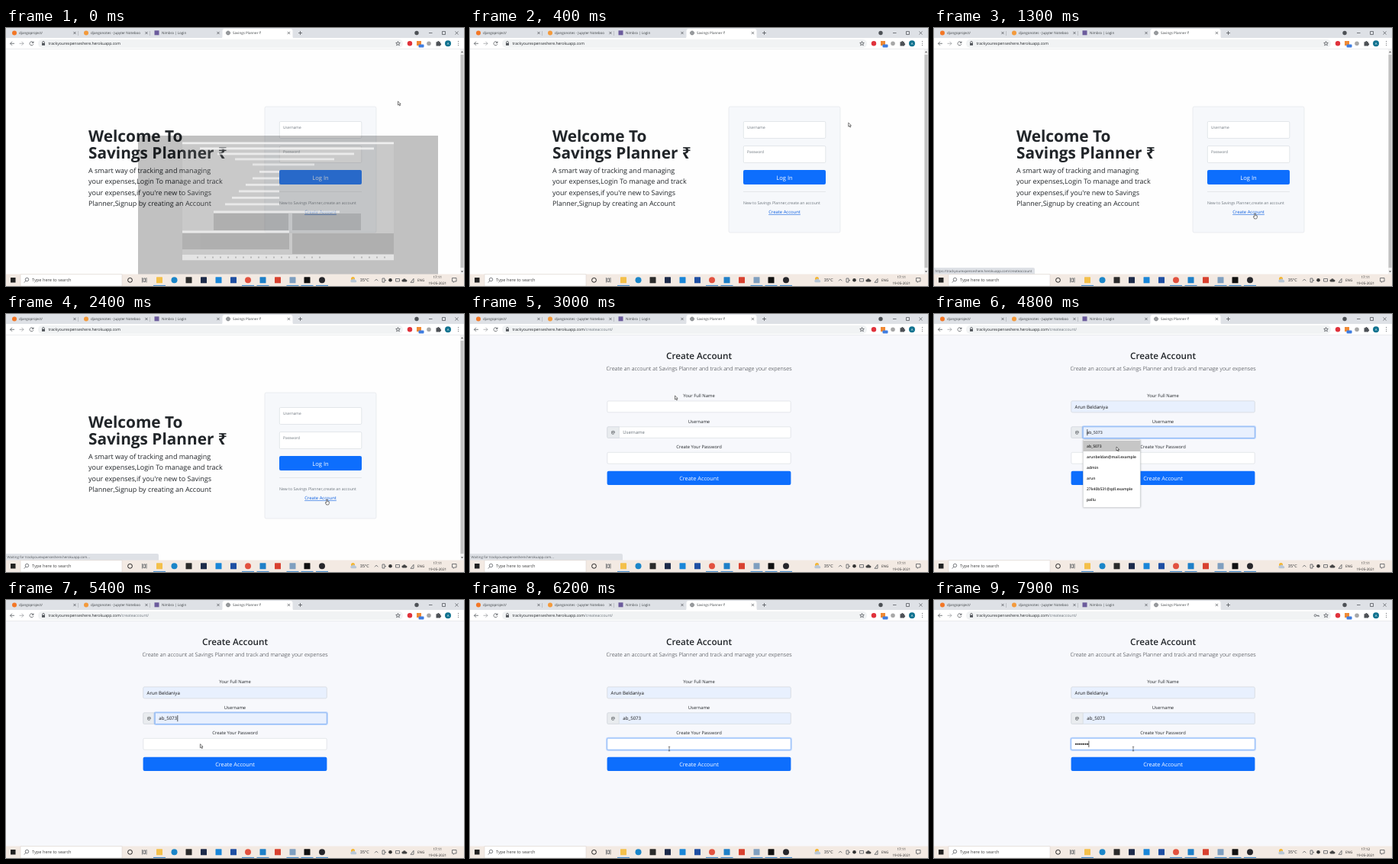
Recreate the animation shown at these times as an HTML page. Size 600x338 px, loop 8 s.

```html
<!DOCTYPE html>
<html lang="en">
<head>
<meta charset="utf-8">
<title>Create account</title>
<style>
  html, body { margin: 0; width: 100%; height: 100%; overflow: hidden; background: #fff; }
  svg { display: block; width: 100vw; height: 100vh; }
  text { font-family: "Open Sans", "Noto Sans", sans-serif; fill: #212529; text-rendering: geometricPrecision; white-space: pre; }
  .mid { text-anchor: middle; }
  .tab { font-size: 4.55px; fill: #3c4043; }
  .url { font-size: 5.1px; }
  .soft { fill: #6c757d; }
  .status { font-size: 4.4px; fill: #50555a; }
  .lead { font-size: 9px; }
  .head { font-size: 20.8px; font-weight: 700; }
  .label { font-size: 5.85px; }
  .value { font-size: 6.1px; fill: #111; }
  .hint { font-size: 5.25px; fill: #111; }
  .item { font-size: 5px; font-weight: 600; fill: #222; }
  .tray { font-size: 4.55px; fill: #222; }
  .input { fill: #fff; stroke: #d3d8de; stroke-width: .6; }
  .auto { fill: #e8f0fe; }
  .ring { fill: none; stroke: #0d6efd; stroke-opacity: .27; stroke-width: 1.7; }
  .focus { stroke: #86b7fe; }
  .menu { fill: #fff; stroke: #c3c6ca; stroke-width: .5; filter: drop-shadow(0 .8px 1px #0004); }
  .line { fill: none; stroke: #4d5156; stroke-width: .75; }
  .caret { stroke: #000; stroke-width: .65; }
</style>
</head>
<body>
<svg viewBox="0 0 600 338">
  <!-- Login page -->
  <g data-on="0 2800">
    <rect y="27" width="600" height="296" fill="#fefefe"/>
    <text class="head" x="108" y="149">Welcome To</text>
    <text class="head" x="108" y="171.2">Savings Planner ₹</text>
    <g class="lead">
      <text x="108" y="190.4">A smart way of tracking and managing</text>
      <text x="108" y="204.4">your expenses,Login To manage and track</text>
      <text x="108" y="218.5">your expenses,if you're new to Savings</text>
      <text x="108" y="232.6">Planner,Signup by creating an Account</text>
    </g>
    <rect x="339" y="103" width="146" height="165" rx="2" fill="#f6f8fb" stroke="#dfe3e8" stroke-width=".6"/>
    <rect class="input" x="358.3" y="122.5" width="107.5" height="22" rx="1.5"/>
    <rect class="input" x="358.3" y="154.5" width="107.5" height="22" rx="1.5"/>
    <text class="soft" x="363" y="131.5" font-size="4.9">Username</text>
    <text class="soft" x="363" y="163.8" font-size="4.9">Password</text>
    <rect x="358" y="186" width="108" height="19" rx="2" fill="#0d6efd"/>
    <text class="mid" x="412" y="198.8" font-size="7.6" style="fill:#fff">Log In</text>
    <path d="M358 214.5h108" stroke="#d9dce0" stroke-width=".6"/>
    <text class="soft" x="358" y="231.3" font-size="5.2">New to Savings Planner,create an account</text>
    <text class="mid" x="412" y="243.3" font-size="5.9" text-decoration="underline" style="fill:#0d5fe0">Create Account</text>
    <rect x="595" y="28" width="5" height="295" fill="#f1f1f1"/>
    <rect x="595.5" y="35" width="4" height="279" fill="#c1c1c1"/>
    <path d="M596 32.3l1.5-2 1.5 2zM596 318.2l1.5 2 1.5-2z" fill="#555"/>
  </g>

  <!-- Account form -->
  <g data-on="2800 8000">
    <rect y="27" width="600" height="296" fill="#f7f8fc"/>
    <text class="mid" x="300" y="59.3" font-size="11.7" font-weight="600">Create Account</text>
    <text class="mid" x="300" y="74" font-size="7.22" font-weight="300">Create an account at Savings Planner and track and manage your expenses</text>
    <text class="mid label" x="300" y="108.5">Your Full Name</text>
    <text class="mid label" x="300" y="142.5">Username</text>
    <text class="mid label" x="300" y="176">Create Your Password</text>

    <rect class="input" x="179.8" y="114" width="240.4" height="14.8" rx="1.6"/>
    <rect class="input" x="179.8" y="147.8" width="240.4" height="14.6" rx="1.6"/>
    <path d="M195.3 147.8h-14a1.5 1.5 0 0 0-1.5 1.6v11.4a1.5 1.5 0 0 0 1.5 1.6h14z" fill="#e9ecef" stroke="#ced4da" stroke-width=".6"/>
    <text class="mid label" x="187.5" y="157.2">@</text>
    <rect class="input" x="179.8" y="181.3" width="240.4" height="14.8" rx="1.6"/>
    <rect x="179.6" y="205.8" width="240.8" height="18.3" rx="2" fill="#0d6efd"/>
    <text class="mid" x="300" y="217.8" font-size="7.3" style="fill:#fff">Create Account</text>

    <rect class="input auto" data-on="3700 8000" x="179.8" y="114" width="240.4" height="14.8" rx="1.6"/>
    <g data-on="3700 4600">
      <rect class="ring" x="179" y="113.2" width="242" height="16.4" rx="2.2"/>
      <rect class="focus" fill="none" stroke-width=".7" x="179.8" y="114" width="240.4" height="14.8" rx="1.6"/>
    </g>
    <text class="hint" data-on="3700 4200" x="184.6" y="123.7">Arun Beldaniya</text>
    <text class="value" data-on="4200 8000" x="184.6" y="123.9">Arun Beldaniya</text>
    <path class="caret" data-on="3700 4200" d="M185 117.3v8.4"/>
    <path class="caret" data-on="4200 4600" d="M228.6 117.3v8.4"/>

    <text class="soft" data-on="2800 4600" x="200.3" y="157.4" font-size="5.9">Username</text>
    <rect class="input auto" data-on="4600 8000" x="195.3" y="147.8" width="224.9" height="14.6" rx="1"/>
    <g data-on="4600 5700">
      <rect class="ring" x="194.5" y="147" width="226.5" height="16.2" rx="1.6"/>
      <rect class="focus" fill="none" stroke-width=".7" x="195.3" y="147.8" width="224.9" height="14.6" rx="1"/>
    </g>
    <text class="hint" data-on="4600 5000" x="200.3" y="157.2">ab_5073</text>
    <text class="value" data-on="5000 8000" x="200.3" y="157.4">ab_5073</text>
    <path class="caret" data-on="4600 5000" d="M200.8 151v8.2"/>
    <path class="caret" data-on="5000 5500" d="M224.8 151v8.2"/>

    <g data-on="5700 8000">
      <rect class="ring" x="179" y="180.5" width="242" height="16.4" rx="2.2"/>
      <rect class="focus" fill="#fff" stroke-width=".7" x="179.8" y="181.3" width="240.4" height="14.8" rx="1.6"/>
    </g>
    <g id="dots"></g>
    <path id="caret" class="caret" data-on="5700 6200 6500 8000" d="M0 184.5v8.4"/>

    <g id="names" data-on="3700 4200"></g>
    <g id="users" data-on="4600 5000"></g>
  </g>

  <!-- Status bubble -->
  <g data-on="1000 2300">
    <path d="M0 314h130a2 2 0 0 1 2 2v7H0z" fill="#dee1e6"/>
    <text class="status" x="1.5" y="320">https://trackyourexpenseshere.herokuapp.com/createaccount</text>
  </g>
  <g data-on="2300 3400">
    <path d="M0 314h198a2 2 0 0 1 2 2v7H0z" fill="#dee1e6"/>
    <text class="status" x="1.5" y="320">Waiting for trackyourexpenseshere.herokuapp.com...</text>
  </g>

  <!-- Minimising window -->
  <g id="ghost" data-on="0 300">
    <rect x="173" y="141" width="393" height="182" opacity=".24"/>
    <rect x="231" y="153" width="277" height="152" fill="#fff" opacity=".12"/>
    <g opacity=".12">
      <rect x="272" y="243" width="98" height="22"/>
      <rect x="375" y="243" width="90" height="22"/>
      <rect x="231" y="269" width="140" height="21"/>
      <rect x="375" y="269" width="133" height="27"/>
    </g>
    <g id="nest" fill="#fff"></g>
    <rect x="231" y="297" width="277" height="7" fill="#fff" opacity=".5"/>
    <path d="M250 300.5h170M455 300.5h45" stroke="#777" stroke-width="2" stroke-dasharray="2 8" opacity=".4"/>
  </g>

  <!-- Browser frame -->
  <rect width="600" height="13.5" fill="#dee1e6"/>
  <rect y="13" width="600" height="14.5" fill="#fff"/>
  <path d="M0 27.5h600" stroke="#dfe1e4" stroke-width=".6"/>
  <path d="M281 13.5q2.5 0 2.5-2.5V4q0-3 3-3h86q3 0 3 3v7q0 2.5 2.5 2.5z" fill="#fff"/>
  <path d="M94.5 4v6M188.5 4v6" stroke="#9a9da2" stroke-width=".5"/>
  <circle cx="11" cy="6.5" r="3" fill="#f37726"/>
  <circle cx="105" cy="6.5" r="3" fill="#f39a3c"/>
  <rect x="194.5" y="3.3" width="6" height="6" fill="#6b5b9c"/>
  <g class="line"><circle cx="291" cy="6.5" r="2.4"/><path d="M288.5 6.5h5M291 4v5"/></g>
  <text class="tab" x="17" y="8.2">djangoproject/</text>
  <text class="tab" x="111" y="8.2">djangonotes - Jupyter Noteboo</text>
  <text class="tab" x="204" y="8.2">Nimbra | Login</text>
  <text class="tab" x="297" y="8.2">Savings Planner ₹</text>
  <g class="line" id="closers"></g>
  <path class="line" d="M383 6.5h5M385.5 4v5M554 6.5h4.5M571.5 4.5h4v4h-4zM588.5 4.500l4 4M592.5 4.500l-4 4"/>
  <circle cx="538" cy="6.5" r="2.7" fill="#4d5156"/>
  <rect x="42" y="14.7" width="478" height="11.3" rx="5.6" fill="#f1f3f4"/>
  <path class="line" d="M11 20.3H5.5M8 17.8l-2.5 2.5 2.5 2.5M35.8 19.2a2.5 2.5 0 1 0 .1 2M36 17.5v2h-2"/>
  <path class="line" d="M17.5 20.3H23M20.5 17.8l2.5 2.5-2.5 2.5" opacity=".55"/>
  <path class="line" d="M47.6 20v-1.2a1.4 1.4 0 0 1 2.8 0V20"/>
  <rect x="47" y="19.8" width="4" height="3" rx=".4" fill="#4d5156"/>
  <text class="url" x="55.5" y="22.1">trackyourexpenseshere.herokuapp.com<tspan class="soft" data-on="2800 8000">/createaccount/</tspan></text>
  <g class="line" data-on="6500 8000"><circle cx="499.5" cy="20.3" r="1.4"/><path d="M501 20.3h3.2v1.7M502.8 20.3v1.3"/></g>
  <path class="line" d="M513.5 17.5l.8 1.9 2 .1-1.6 1.3.6 2-1.8-1.1-1.8 1.1.6-2-1.6-1.3 2-.1z"/>
  <circle cx="529" cy="20.3" r="3.2" fill="#e0323c"/>
  <rect x="538" y="17" width="6" height="6" fill="#f08a35"/>
  <rect x="540.5" y="21.5" width="7" height="4" rx="1" fill="#3f7de0"/>
  <circle cx="554" cy="20.3" r="2.8" fill="#a8a8a8"/>
  <path d="M563.5 18.3h1.7a1.2 1.2 0 0 1 2.4 0h1.4v1.8a1.2 1.2 0 0 1 0 2.4v1h-5.5z" fill="#4d5156"/>
  <circle cx="579" cy="20.3" r="4" fill="#10728f"/>
  <text class="mid" x="579" y="21.9" font-size="4.3" style="fill:#fff">A</text>
  <path d="M592.5 17.5v5.7" stroke="#4d5156" stroke-width="1.1" stroke-linecap="round" stroke-dasharray="0 2.5"/>

  <!-- Taskbar -->
  <rect y="322.5" width="600" height="15.5" fill="#f3eae3"/>
  <rect x="19" y="322.8" width="133" height="15.2" fill="#fff" stroke="#d5cec8" stroke-width=".5"/>
  <rect x="6" y="327" width="6.5" height="6.5" fill="#222"/>
  <g class="line"><circle cx="27.5" cy="329.5" r="2.2"/><path d="M26 331.2l-2.2 2.3"/></g>
  <text x="34" y="332.4" font-size="5.65" style="fill:#444">Type here to search</text>
  <circle cx="162.5" cy="330.3" r="2.9" fill="none" stroke="#222"/>
  <path class="line" d="M178.5 327v6.5M184 327v6.5M180 328h2.5v4.5H180z"/>
  <g id="apps"></g>
  <circle cx="454.5" cy="328.5" r="2.5" fill="#f5b52e"/>
  <path d="M452.5 333.3a1.8 1.8 0 0 1 .6-3.5 2.5 2.5 0 0 1 4.5.2 1.7 1.7 0 0 1 .5 3.3z" fill="#b9c7d6"/>
  <text x="463.8" y="332.3" font-size="5.45">35°C</text>
  <path class="line" d="M483 331.3l2.2-2.2 2.2 2.2M493 328h3v5h-3zM496 330.5h2M510.5 328.5h5v3.5h-5zM530 333.3l4-5v5z"/>
  <circle cx="503.5" cy="330.3" r="2.3" fill="#333"/>
  <path d="M519.8 332.5a1.5 1.5 0 0 1 .3-3 2 2 0 0 1 3.8.2 1.4 1.4 0 0 1 .3 2.8z" fill="#444"/>
  <text class="tray" x="539" y="332">ENG</text>
  <text class="tray mid" x="565.3" y="328.3"><tspan data-on="0 7000">17:11</tspan><tspan data-on="7000 8000">17:12</tspan></text>
  <text class="tray mid" x="565.3" y="335.6">19-05-2021</text>
  <path class="line" d="M584.5 327.5h5.5v4.5h-2.5l-1.2 1.3v-1.3h-1.8z"/>

  <g id="pointer">
    <path data-on="0 900 2500 3300 3800 4400 4700 5500" d="M0 0v5l1.2-1 .9 1.9.9-.4-.9-1.9h1.6z" fill="#fff" stroke="#222" stroke-width=".6"/>
    <path data-on="900 2500" d="M-.6 0h1.2v2.4l2.2.5v2.4l-.8 1.6H-.8L-2.2 4l.7-.6.9.7z" fill="#fff" stroke="#222" stroke-width=".6"/>
    <path data-on="3300 3800 4400 4700 5500 8000" d="M-1.2-2.7h2.4M0-2.7v5.4M-1.2 2.7h2.4" fill="none" stroke="#333" stroke-width=".6"/>
  </g>
</svg>
<script>
const LOOP = 8000, STEP = 100;
const $ = id => document.getElementById(id);
const add = (id, markup) => $(id).insertAdjacentHTML("beforeend", markup);

function menu(id, x, y, w, items) {
  add(id, `<rect class="menu" x="${x}" y="${y}" width="${w}" height="88.5" rx="1"/>
    <rect x="${x}" y="${y + 1}" width="${w}" height="14" fill="#c6c6c6"/>`);
  items.forEach((s, i) => add(id, `<text class="item" x="${x + 4.7}" y="${y + 9.7 + i * 14}">${s}</text>`));
}
menu("names", 179.7, 131, 84.5, ["Arun Beldaniya", "Pallavi Nerota", "Bolteri", "Dilip", "VELAMPURA SENIOR SCHOOL", "abc"]);
menu("users", 195.3, 165, 75, ["ab_5073", "arunbeldan@mail.example", "admin", "arun", "27k40b531@qdl.example", "pallu"]);

for (const x of [90, 184, 278, 370.5])
  add("closers", `<path d="M${x - 1.6} 4.9l3.2 3.2m0-3.2l-3.2 3.2"/>`);

// Taskbar: centre, colour, round, running
const apps = [
  [201, "#f4c04a", 0, 1], [220.5, "#1b86c9", 1, 0], [239.5, "#2b2b2b", 0, 0], [259, "#1d2b4a", 0, 0],
  [278.5, "#1a86d8", 0, 0], [298, "#1f4fa3", 0, 0], [317, "#e2513f", 1, 1], [336.5, "#1f80c8", 0, 1],
  [356, "#d8412f", 0, 0], [375.5, "#7f9fc0", 0, 1], [394.5, "#111", 0, 1], [414, "#26262b", 1, 1]
];
for (const [x, color, round, running] of apps) {
  if (running) add("apps", `<rect x="${x - 8}" y="336.9" width="16" height="1.1" fill="#4b8fce"/>`);
  add("apps", `<rect x="${x - 4}" y="326.2" width="8" height="8" rx="${round ? 4 : .5}" fill="${color}"/>`);
}

// Receding reflections inside the minimising window
const bar = (x, y, w, o) => add("nest", `<rect x="${x}" y="${y}" width="${w}" height="2.8" opacity="${o}"/>`);
for (let i = 0; i < 5; i++) bar(231 + i * 23, 149.5 + i * 7, 277 - i * 49, .75 - i * .06);
for (let i = 0; i < 6; i++) bar(332 - i * 9, 187 + i * 8.5, 26 + i * 9, .6);
bar(272, 239.5, 165, .6);
bar(231, 265.5, 140, .6);

const keyTimes = [6500, 6800, 7100, 7300, 7450, 7600, 7750];
keyTimes.forEach((t, i) =>
  add("dots", `<circle data-on="${t} ${LOOP}" cx="${186 + i * 2.55}" cy="188.8" r=".95"/>`));

const path = [
  [0, 513.5, 96], [200, 513.5, 96], [900, 424, 238], [1100, 420.5, 243], [2400, 420.5, 243],
  [3000, 268.5, 107], [3500, 249, 121], [3700, 248, 122], [3900, 247, 134], [4250, 247, 134],
  [4500, 240, 156], [4600, 240, 157], [4800, 239, 174], [5050, 239, 174], [5600, 261, 195], [LOOP, 261, 195]
];
function pointAt(t) {
  const i = path.findIndex(p => p[0] > t);
  const [t0, x0, y0] = path[i - 1], [t1, x1, y1] = path[i];
  const u = (t - t0) / (t1 - t0), e = u * u * (3 - 2 * u);
  return [x0 + (x1 - x0) * e, y0 + (y1 - y0) * e];
}

const timed = [...document.querySelectorAll("[data-on]")].map(el => ({ el, at: el.dataset.on.split(" ").map(Number) }));
const isOn = (at, t) => at.filter(edge => edge <= t).length % 2 === 1;

function draw(t) {
  for (const { el, at } of timed) el.style.display = isOn(at, t) ? "" : "none";
  $("pointer").setAttribute("transform", `translate(${pointAt(t)})`);
  const typed = keyTimes.filter(k => k <= t).length;
  $("caret").setAttribute("transform", `translate(${185 + typed * 2.55})`);
  const u = Math.min(t / 300, 1);
  $("ghost").setAttribute("opacity", (1 - u) ** 1.3);
  $("ghost").setAttribute("transform", `translate(413 330) scale(${1 - .35 * u}) translate(-413 -330)`);
}

const start = performance.now();
function tick() {
  const t = (performance.now() - start) % LOOP;
  draw(Math.floor(t / STEP) * STEP);
  requestAnimationFrame(tick);
}
tick();
</script>
</body>
</html>
```
